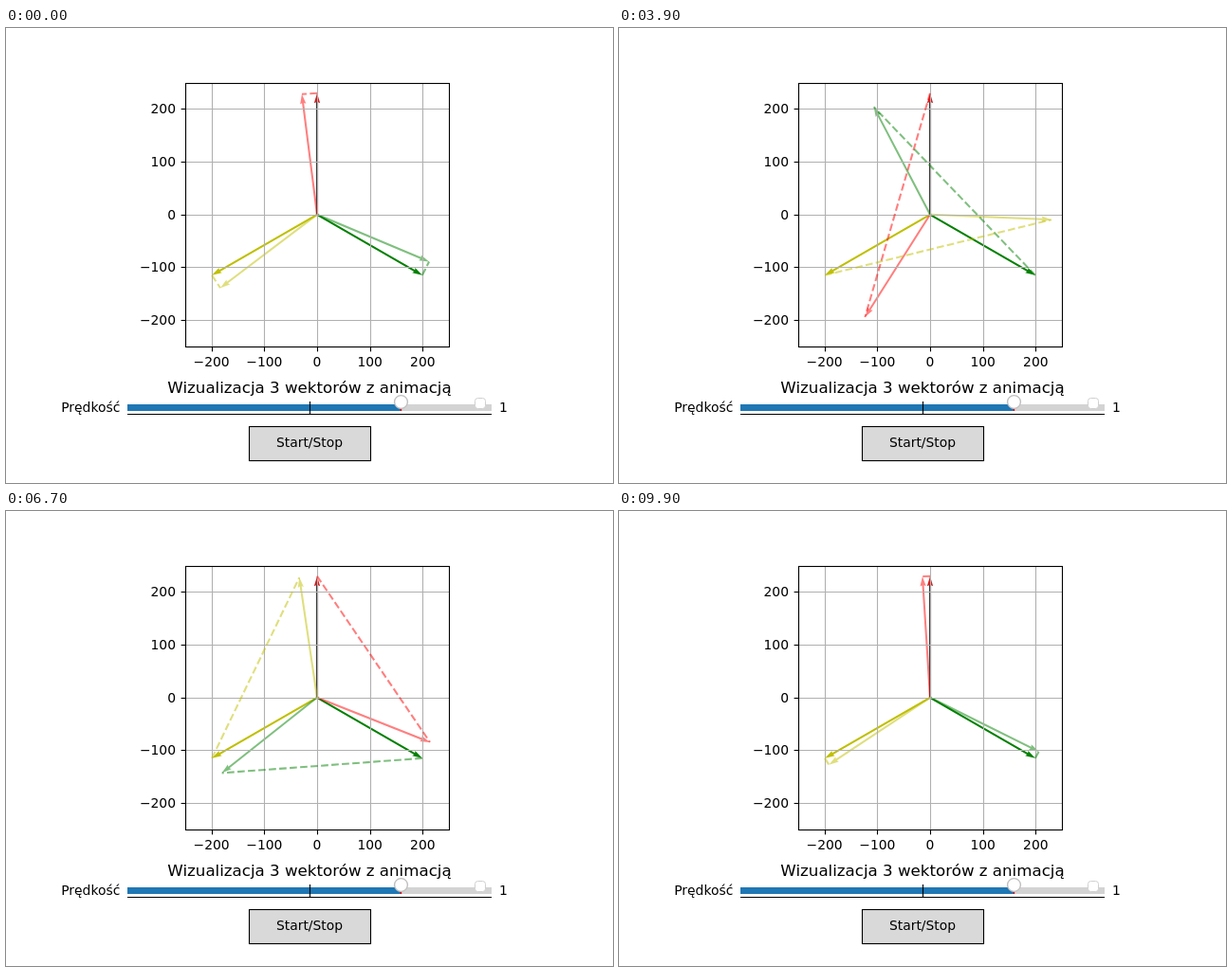
An HTML page with a canvas for the animation above (10000 ms loop, 640 px wide and 480 px high).

```html
<!DOCTYPE html>
<html lang="pl">
<head>
<meta charset="utf-8">
<style>
html, body { margin: 0; width: 640px; height: 480px; overflow: hidden; background: #fff; }
canvas { display: block; }
</style>
</head>
<body>
<canvas id="stage" width="640" height="480"></canvas>
<script>
const c = document.getElementById('stage').getContext('2d');
const CX = 328, CY = 196.8, SCALE = 0.5568, RADIUS = 230 * SCALE;
const TICKS = [-200, -100, 0, 100, 200];
const VECTORS = [[90, '#f00'], [-30, '#008000'], [210, '#bfbf00']];
const snap = v => Math.round(v) + 0.5;

function line(x1, y1, x2, y2, color, width = 1.11) {
  c.strokeStyle = color;
  c.lineWidth = width;
  c.beginPath();
  c.moveTo(x1, y1);
  c.lineTo(x2, y2);
  c.stroke();
}

function rect(x, y, w, h, color) {
  c.fillStyle = color;
  c.fillRect(x, y, w, h);
}

function frame(x, y, w, h) {
  c.strokeStyle = '#000';
  c.lineWidth = 1.11;
  c.strokeRect(x, y, w, h);
}

function text(s, x, y, align = 'center', size = 13.89) {
  c.font = size + 'px "DejaVu Sans", sans-serif';
  c.textAlign = align;
  c.fillStyle = '#000';
  c.fillText(s, x, y);
}

function tip(deg) {
  const a = deg * Math.PI / 180;
  return [CX + RADIUS * Math.cos(a), CY - RADIUS * Math.sin(a)];
}

function polygon(points, color) {
  c.fillStyle = color;
  c.beginPath();
  points.forEach(p => c.lineTo(...p));
  c.fill();
}

function arrow(deg, color, shaft) {
  const r = RADIUS, neck = r - 9.4, back = r - 10.44;
  c.save();
  c.translate(CX, CY);
  c.rotate(-deg * Math.PI / 180);
  polygon([[0, -1.04], [neck, -1.04], [back, -3.13], [r, 0],
    [back, 3.13], [neck, 1.04], [0, 1.04]], color);
  if (shaft) rect(0, -1.04, neck, 2.08, shaft);
  c.restore();
}

function plot(turn) {
  for (const [deg, color] of VECTORS) {
    arrow(deg, deg === 90 ? '#d01818' : color, deg === 90 && '#333');
  }
  c.globalAlpha = 0.5;
  for (const [deg, color] of VECTORS) arrow(deg + turn, color);
  c.globalAlpha = 1;

  for (const v of TICKS) {
    const x = snap(CX + v * SCALE), y = snap(CY - v * SCALE);
    const label = String(v).replace('-', '\u2212');
    line(x, 58, x, 336, '#b0b0b0');
    line(189, y, 467, y, '#b0b0b0');
    line(x, 336.5, x, 341.4, '#000');
    line(184.6, y, 189.5, y, '#000');
    text(label, CX + v * SCALE, 357);
    text(label, 179, Math.round(y + 4.6), 'right');
  }

  c.globalAlpha = 0.5;
  c.setLineDash([7.71, 3.33]);
  for (const [deg, color] of VECTORS) line(...tip(deg), ...tip(deg + turn), color, 2.08);
  c.setLineDash([]);
  c.globalAlpha = 1;
  frame(189.5, 58.5, 278, 278);
}

function controls() {
  text('Wizualizacja 3 wektorów z animacją', 320, 385, 'center', 16.67);
  rect(128, 397, 384, 7, '#d3d3d3');
  rect(128, 397, 288, 7, '#1f77b4');
  line(416.5, 397, 416.5, 404, '#f00', 1.39);
  line(320.5, 394, 320.5, 408, '#000');
  line(128, 407.5, 512, 407.5, '#000');
  c.fillStyle = '#fff';
  c.strokeStyle = '#bfbfbf';
  c.lineWidth = 1.39;
  c.beginPath();
  c.arc(416.5, 394.5, 6.9, 0, 7);
  c.fill();
  c.stroke();
  c.strokeStyle = '#d0d0d0';
  c.lineWidth = 1;
  c.beginPath();
  c.roundRect(494.5, 390.5, 11, 11, 3);
  c.fill();
  c.stroke();
  text('Prędkość', 120.3, 405, 'right');
  text('1', 520, 405, 'left');
  rect(256, 420, 128, 36, '#d9d9d9');
  frame(256.5, 420.5, 128, 36);
  text('Start/Stop', 320, 442);
}

function draw() {
  const step = Math.floor(performance.now() % 10000 / 100);
  rect(0, 0, 640, 480, '#fff');
  plot(3.6 * (step + 2));
  controls();
  requestAnimationFrame(draw);
}
draw();
</script>
</body>
</html>
```
